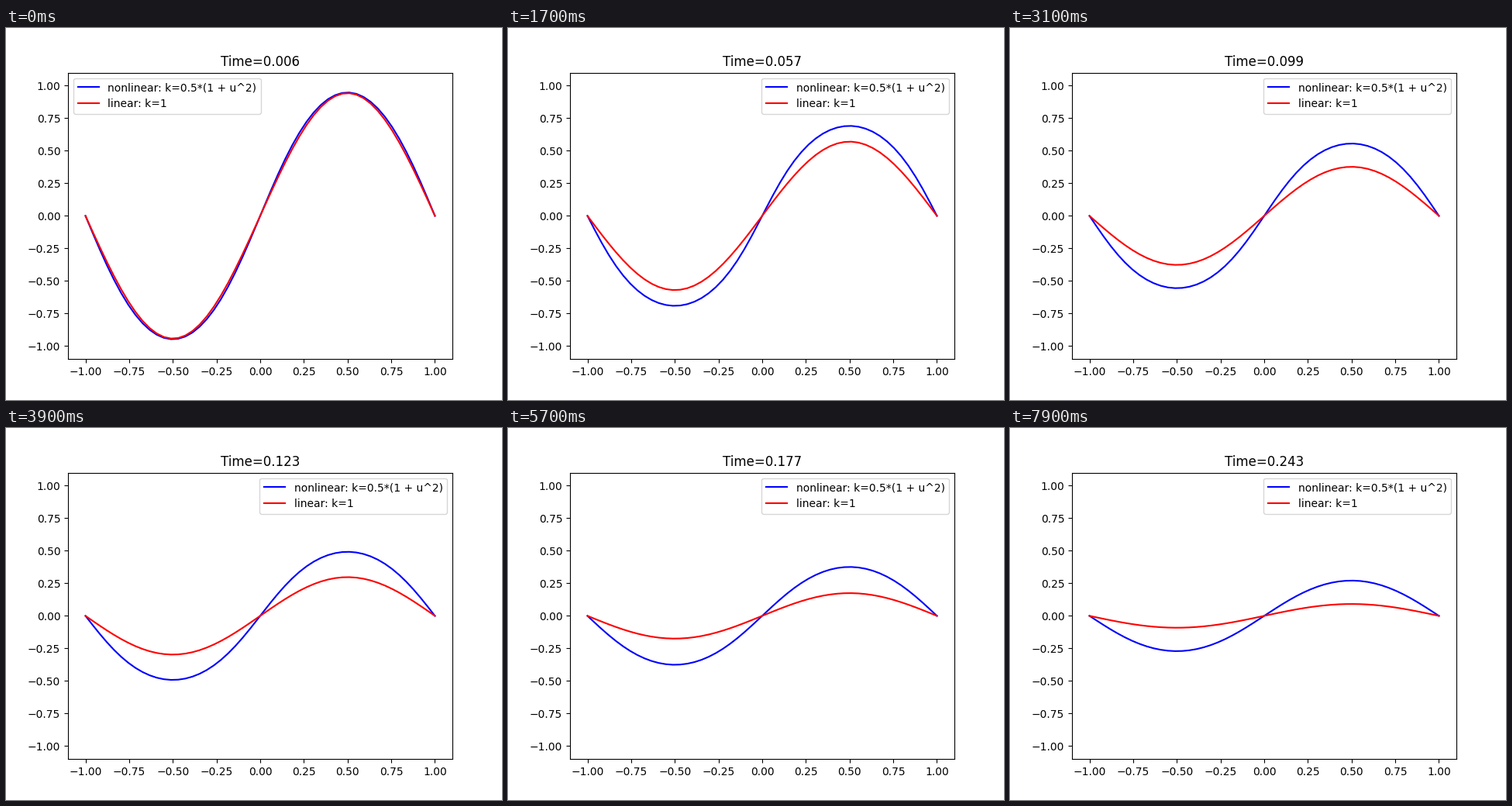
A matplotlib script that plays this animation: 640x480 px, repeating every 8 s.

```python
import numpy as np
import matplotlib.pyplot as plt
from matplotlib.animation import FuncAnimation

FRAMES = 80
INTERVAL = 100      # ms
DT = 0.003          # model time per frame
FIRST = 2           # the shown sequence starts after two steps
SUBSTEPS = 30

x = np.linspace(-1, 1, 50)
dx = x[1] - x[0]


def nonlinear_k(u):
    return 0.5 * (1 + u**2)


def linear_k(u):
    return np.ones_like(u)


def solve(k):
    """Explicit finite volumes for u_t = (k(u) u_x)_x with u = 0 at the ends."""
    u = np.sin(np.pi * x)
    u[0] = u[-1] = 0
    h = DT / SUBSTEPS
    states = [u.copy()]
    for _ in range(FIRST + FRAMES - 1):
        for _ in range(SUBSTEPS):
            flux = k((u[1:] + u[:-1]) / 2) * np.diff(u) / dx
            u[1:-1] += h * np.diff(flux) / dx
        states.append(u.copy())
    return states


nonlinear = solve(nonlinear_k)
linear = solve(linear_k)

plt.rcParams["font.family"] = "DejaVu Sans"
fig, ax = plt.subplots(figsize=(6.4, 4.8), dpi=100)
blue, = ax.plot(x, nonlinear[FIRST], "b", label="nonlinear: k=0.5*(1 + u^2)")
red, = ax.plot(x, linear[FIRST], "r", label="linear: k=1")
ax.set_xlim(-1.1, 1.1)
ax.set_ylim(-1.1, 1.1)
title = ax.set_title("")
ax.legend(loc="best")   # moves to the right once the crest is out of the way


def update(i):
    n = i + FIRST
    blue.set_ydata(nonlinear[n])
    red.set_ydata(linear[n])
    title.set_text(f"Time={n * DT:.3f}")
    return blue, red, title


anim = FuncAnimation(fig, update, frames=FRAMES, interval=INTERVAL,
                     repeat=True, repeat_delay=0, blit=False)
plt.show()
```
